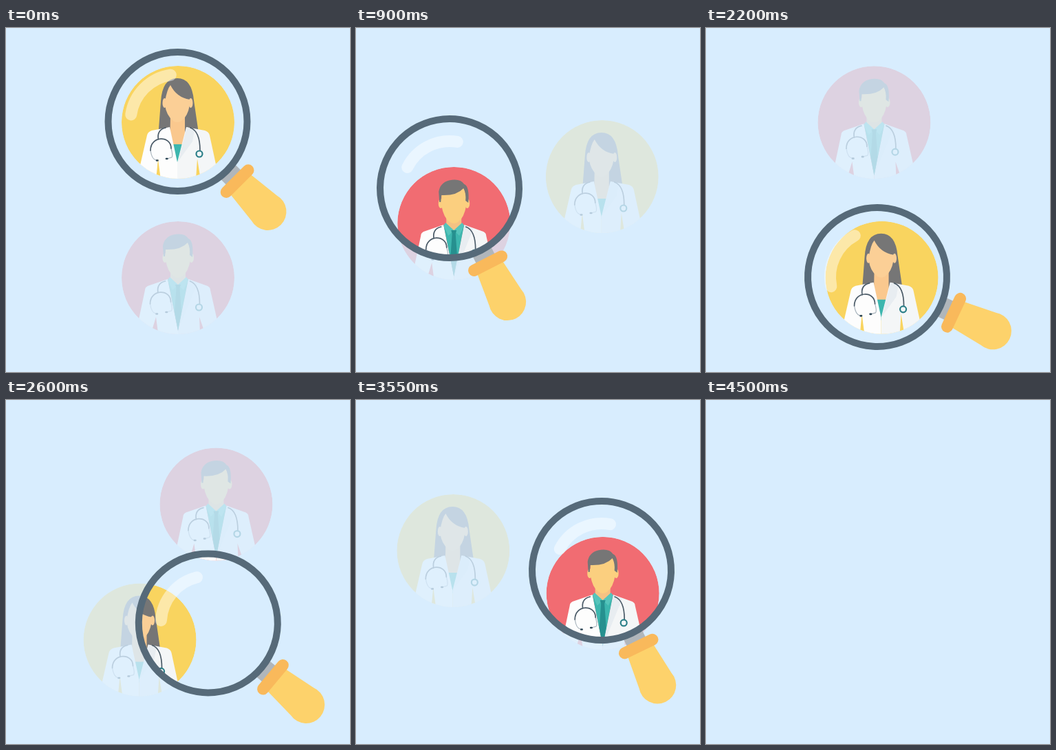
These frames come from a looping animation (500x500 px, 4.55 s). An HTML page:

```html
<!DOCTYPE html>
<html lang="en">
<head>
<meta charset="utf-8">
<title>Doctor search</title>
<style>
  html, body { margin: 0; width: 100%; height: 100%; overflow: hidden; background: #d8edfe; }
  svg { display: block; width: 100vw; height: 100vh; }
</style>
</head>
<body>
<svg viewBox="0 0 500 500">
  <defs>
    <clipPath id="disc"><circle r="82"/></clipPath>
    <clipPath id="glass"><circle id="glassHole" r="97"/></clipPath>

    <g id="stethoscope" fill="none" stroke="#4b5b68" stroke-width="1.7" stroke-linecap="round">
      <path stroke="#a9b4bd" stroke-width="1.2" d="M-40 41Q-38 54-32 55M-10 38Q-7 48-9 51L-16 53"/>
      <path d="M-18 8Q-31 11-28.500 25M18 8Q32 13 32 41M-40 41C-40 19-10 19-10 38"/>
      <path stroke="#2f4858" stroke-width="2.600" d="M-31 55.500h1.500M-17 53h1.500"/>
      <circle cx="31" cy="46" r="4.500" stroke="#2b7f88" stroke-width="2.200" fill="#f4f7f8"/>
    </g>

    <g id="woman" clip-path="url(#disc)">
      <circle r="82" fill="#f9d45f"/>
      <path fill="#767676" d="M-28.500 16L-25-30Q-23-64-1-64Q20-64 23-32L30 16Z"/>
      <path fill="#fac88e" d="M-11-10H10V12L12 40H-12Z"/>
      <path fill="#3db6ae" d="M-12 32H12V62H-12Z"/>
      <path fill="#fdfdfd" d="M-12 7L-1 58V84H-60L-45 19Q-44 14-38 12Z"/>
      <path fill="#f4f6f7" d="M12 7L-1 58V84H60L46 19Q45 14 39 12Z"/>
      <path fill="#e8edf1" d="M13 7L24 12L21 28L0 57Z"/>
      <path fill="#f9d45f" d="M-29 53L-32 84H-25ZM28 53L26 84H33Z"/>
      <g fill="#fbcf96">
        <ellipse cx="-19.500" cy="-28" rx="3" ry="7"/>
        <ellipse cx="18.500" cy="-28" rx="3" ry="7"/>
        <path d="M-19-30Q-16-48-11-54Q-2-36 17-33V-25Q14-8 5-2Q-1 2-7-2Q-17-10-19-25Z"/>
      </g>
      <use href="#stethoscope"/>
    </g>

    <g id="man" clip-path="url(#disc)">
      <circle r="82" fill="#f16c72"/>
      <path fill="#f5c283" d="M-11-10H11V14H-11Z"/>
      <path fill="#fdfdfd" d="M-15 2L0 77V84H-62L-48 18Q-48 14-44 12Z"/>
      <path fill="#f4f6f7" d="M15 2L0 77V84H62L47 18Q47 14 43 12Z"/>
      <path fill="#e8edf1" d="M15 2L28 8L20 28L0 77Z"/>
      <path fill="#3db6ae" d="M-15 2L0 12L15 2L0 77Z"/>
      <path fill="#55c4bb" d="M-12-1L0 10L-8 18L-15 3ZM12-1L0 10L8 18L15 3Z"/>
      <path fill="#26908f" d="M-4 10H4L2.500 15L5 50L0 77L-5 50L-2.500 15Z"/>
      <path fill="#f16c72" d="M-32 57L-39 80H-29ZM31 57L39 80H32Z"/>
      <g fill="#fbcf7f">
        <ellipse cx="-19" cy="-29" rx="3.500" ry="7"/>
        <ellipse cx="19.500" cy="-29" rx="3.500" ry="7"/>
        <path d="M-18-48L14-53L18-40V-26Q15-8 6-2Q0 2-6-2Q-15-8-18-26Z"/>
      </g>
      <path fill="#767676" d="M-21-31L-22-46Q-20-59-7-62.500Q9-66 15-57Q23-54 21-30L17-33Q18-44 14-51Q4-40-18-41L-19-31Z"/>
      <use href="#stethoscope" x="-0.500" y="-3"/>
    </g>
  </defs>

  <g id="scene">
    <g opacity=".2"><use href="#woman" class="woman"/></g>
    <g opacity=".2"><use href="#man" class="man"/></g>
    <g clip-path="url(#glass)">
      <use href="#woman" class="woman"/>
      <use href="#man" class="man"/>
    </g>
    <g id="lens">
      <path d="M-54.500-41A68.200 68.200 0 0 1-41-54.500" id="shine" fill="none" stroke="#fff" stroke-opacity=".46" stroke-width="17" stroke-linecap="round"/>
      <path fill="#b0b6bb" d="M104-15H118V15H104Z"/>
      <path fill="#fdd26b" d="M128-20.500L178-26A27 27 0 1 1 178 26L128 20.500Z"/>
      <rect x="114" y="-31" width="17" height="62" rx="8.500" fill="#f9b95b"/>
      <circle r="101" fill="none" stroke="#566a79" stroke-width="10"/>
    </g>
  </g>
</svg>
<script>
  const LOOP = 4550, VISIBLE = 4500, STEP = 50, TURN = 4470;
  const scene = document.getElementById('scene');
  const lens = document.getElementById('lens');
  const hole = document.getElementById('glassHole');

  // time, centre x, centre y, handle angle
  const path = [
    [0, 249.5, 136, 45], [550, 165, 195, 57], [900, 136, 233, 63], [1100, 135, 250, 64],
    [1600, 175, 276, 58.7], [2200, 249, 362, 25], [2950, 333, 291.5, 52.7],
    [3300, 355, 263, 60.5], [3550, 357, 248, 64], [3850, 328, 218, 58], [4500, 249.5, 136, 45]
  ];

  function lensAt(t) {
    const i = path.findIndex(key => key[0] > t);
    const a = path[i - 1], b = path[i];
    const k = (t - a[0]) / (b[0] - a[0]);
    return a.map((v, n) => v + (b[n] - v) * k).slice(1);
  }

  function place(name, angle) {
    const x = 250 + 113 * Math.cos(angle), y = 250 + 113 * Math.sin(angle);
    for (const el of document.getElementsByClassName(name))
      el.setAttribute('transform', `translate(${x} ${y})`);
  }

  // Highlight arc sits opposite the handle
  const polar = deg => [68.5 * Math.cos(deg * Math.PI / 180), 68.5 * Math.sin(deg * Math.PI / 180)];
  document.getElementById('shine').setAttribute('d', `M${polar(143.5)}A68.5 68.5 0 0 1 ${polar(216.5)}`);

  function draw() {
    const t = Math.floor(performance.now() % LOOP / STEP) * STEP;
    const shown = t < VISIBLE;
    scene.setAttribute('visibility', shown ? 'visible' : 'hidden');
    if (shown) {
      const angle = t / TURN * 2 * Math.PI;
      place('woman', angle - Math.PI / 2);
      place('man', angle + Math.PI / 2);
      const [x, y, tilt] = lensAt(t);
      hole.setAttribute('cx', x);
      hole.setAttribute('cy', y);
      lens.setAttribute('transform', `translate(${x} ${y}) rotate(${tilt})`);
    }
    requestAnimationFrame(draw);
  }
  draw();
</script>
</body>
</html>
```
